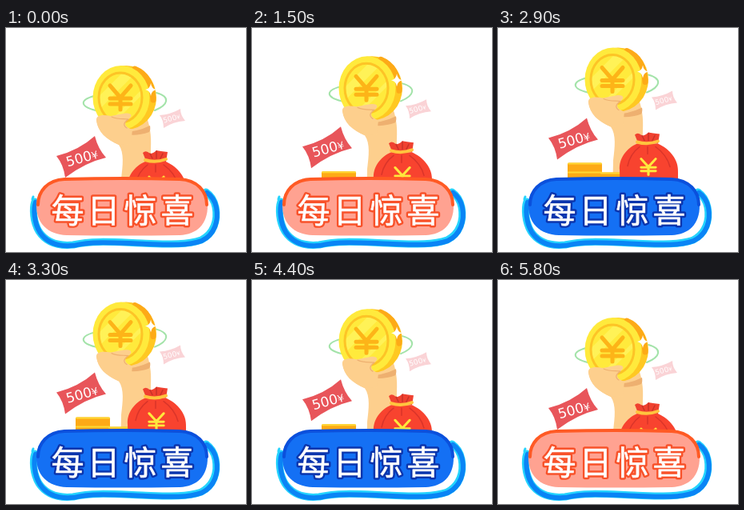
An HTML page for the animation above (5.9 s loop, 300 by 280 pixels).

```html
<!DOCTYPE html>
<html lang="zh-CN">
<head>
<meta charset="utf-8">
<style>
  html, body { margin: 0; width: 100%; height: 100%; overflow: hidden; background: #fff; }
  svg { display: block; width: 300px; height: 280px; }
  svg { --pill: #ffa291; --rim: #ff5a24; --ink: #f8522a; }
  svg.blue { --pill: #1470f4; --rim: #0b50dc; --ink: #0b35ad; }
  #pill { fill: var(--pill); }
  #rim { stroke: var(--rim); stroke-width: 4; }
  #title { font: 500 41px "Noto Sans CJK SC", "Noto Sans CJK", sans-serif; text-anchor: middle;
    fill: #fff; stroke-linejoin: round; }
  .outline { stroke: var(--ink); stroke-width: 5.5; }
  .face { stroke: #fff; stroke-width: .6; }
  .note { font-family: "DejaVu Sans", sans-serif; text-anchor: middle; fill: #fff; }
  .line { fill: none; stroke-linecap: round; stroke-linejoin: round; }
</style>
</head>
<body>
<svg id="stage" viewBox="0 0 300 280">
  <defs>
    <path id="yen" class="line" d="M-13 -15L0 0L13 -15M0 0V15M-13 1H13M-13 8H13"/>
    <clipPath id="coinFace"><ellipse cx="143" cy="87" rx="27" ry="31"/></clipPath>
    <path id="brush" class="line" d="M36 217C33 226 34 242 41 254C50 268 64 273 84 271C110 265 140 268 170 269C200 270 224 272 244 265C260 257 265 240 262 224C260 214 256 209 250 205"/>
    <g id="word">
      <text x="77" y="243">每</text><text x="122" y="243">日</text>
      <text x="168" y="243">惊</text><text x="214" y="243">喜</text>
    </g>
  </defs>

  <g id="prize">
    <!-- hand behind the coin -->
    <path fill="#fdcf8d" d="M130 122L174 108C180 119 182 136 181 150L180 188V240H143L144 188C146 172 148 156 141 146C125 139 115 130 113 115Z"/>
    <path fill="#eeb070" d="M142 131Q164 130 180 122Q181 127 179 130Q160 137 142 131Z"/>

    <!-- coin -->
    <g class="line" stroke="#a3e3a9" stroke-width="2">
      <path d="M110 85C92 90 92 98 112 103"/>
      <path d="M188 81C206 86 203 96 186 103"/>
    </g>
    <ellipse cx="150" cy="87" rx="38" ry="40" fill="#ffc822"/>
    <path class="line" stroke="#fdaa17" stroke-width="7" d="M161 51Q183 60 184 90"/>
    <ellipse cx="144" cy="87" rx="35.500" ry="40" fill="#ffea3c"/>
    <g clip-path="url(#coinFace)" class="line" stroke="#fff257">
      <path stroke-width="12" d="M105 105L165 45"/>
      <path stroke-width="5" d="M125 125L185 65"/>
    </g>
    <ellipse cx="143" cy="87" rx="27" ry="31" fill="none" stroke="#fdc426" stroke-width="3"/>
    <use href="#yen" x="143" y="87" stroke="#fdb418" stroke-width="5"/>
    <path fill="#fff" d="M181 69Q182 76 188 77Q182 78 181 85Q180 78 174 77Q180 76 181 69Z"/>

    <!-- fingers over the coin -->
    <path fill="#fdcf8d" d="M113 116C112 109 120 108 131 110L147 107C157 105 159 110 153 114C146 119 149 124 158 127L156 145L141 146C125 139 115 130 113 116Z"/>
    <path class="line" stroke="#eeb070" stroke-width="1.200" d="M132 111C141 115 147 113 153 114C147 118 146 122 151 125"/>

    <!-- notes -->
    <path fill="#e8555a" d="M63 160Q91 153 111 135Q115 151 125 162Q99 168 74 187Q72 171 63 160Z"/>
    <text class="note" font-size="17" transform="translate(95 162) rotate(-16)" y="6">500<tspan font-size="13">¥</tspan></text>
    <path fill="#fad3d6" d="M192 109Q206 108 218 101Q218 109 224 116Q209 117 197 125Q197 115 192 109Z"/>
    <text class="note" font-size="9" transform="translate(207 113) rotate(-15)" y="3">500<tspan font-size="7">¥</tspan></text>

    <!-- coin stacks -->
    <g fill="#fdaa16">
      <rect x="128" y="203" width="32" height="10" rx="2"/>
      <rect x="87" y="191" width="43" height="22" rx="2"/>
    </g>
    <path class="line" stroke="#ffd935" stroke-width="2" d="M129 204H158M88 192H129M88 203H129"/>

    <!-- bag -->
    <path fill="#f8432f" d="M174 167C160 173 151 186 152 200L153 236H225V203C226 187 215 174 200 167Z"/>
    <path class="line" stroke="#d9342a" stroke-width="1.500" d="M177 171Q165 180 162 195M197 171Q211 181 215 196M187 171V180"/>
    <path fill="#f04130" d="M175 166L171 156Q175 152 180 157Q184 157 188 153Q193 154 202 155L200 167Z"/>
    <path class="line" stroke="#c93328" stroke-width="1.500" d="M180 157L183 163M188 154V163M196 157L193 163"/>
    <path class="line" stroke="#ffc43e" stroke-width="4" d="M174 165Q187 169 200 164"/>
    <use href="#yen" stroke="#ffe83c" stroke-width="4.500" transform="translate(188 196) scale(.7 .66)"/>
  </g>

  <!-- button -->
  <path fill="#fff" d="M36 217C33 226 34 242 41 254C50 268 64 273 84 271H244C260 257 265 240 262 224L250 205L150 190H70Z"/>
  <use href="#brush" stroke="#25d3fd" stroke-width="9"/>
  <use href="#brush" stroke="#0a84f5" stroke-width="6" transform="translate(1 .8)"/>
  <path class="line" stroke="#25d3fd" stroke-width="3" d="M34 211L33 214"/>
  <path id="pill" d="M73 188Q148 186 217 188C240 189 252 204 252 222C252 245 239 258 217 259Q146 260 76 259C51 258 38 243 38 222C38 203 51 189 73 188Z"/>
  <path id="rim" class="line" d="M40 221C40 204 52 190 73 189Q148 187 217 189C239 190 251 204 251 221"/>
  <g id="title">
    <use href="#word" class="outline"/>
    <use href="#word" class="face"/>
  </g>
</svg>
<script>
  const STEP = 100, HALF = 29, LOOP = 59, RISE = 22.5;
  const stage = document.getElementById("stage");
  const prize = document.getElementById("prize");

  function draw() {
    const n = Math.floor(performance.now() / STEP) % LOOP;
    const lift = RISE * Math.min(n, 2 * HALF - n) / HALF;
    prize.setAttribute("transform", `translate(0 ${-lift})`);
    stage.classList.toggle("blue", n >= HALF && n < 2 * HALF);
    requestAnimationFrame(draw);
  }
  draw();
</script>
</body>
</html>
```
